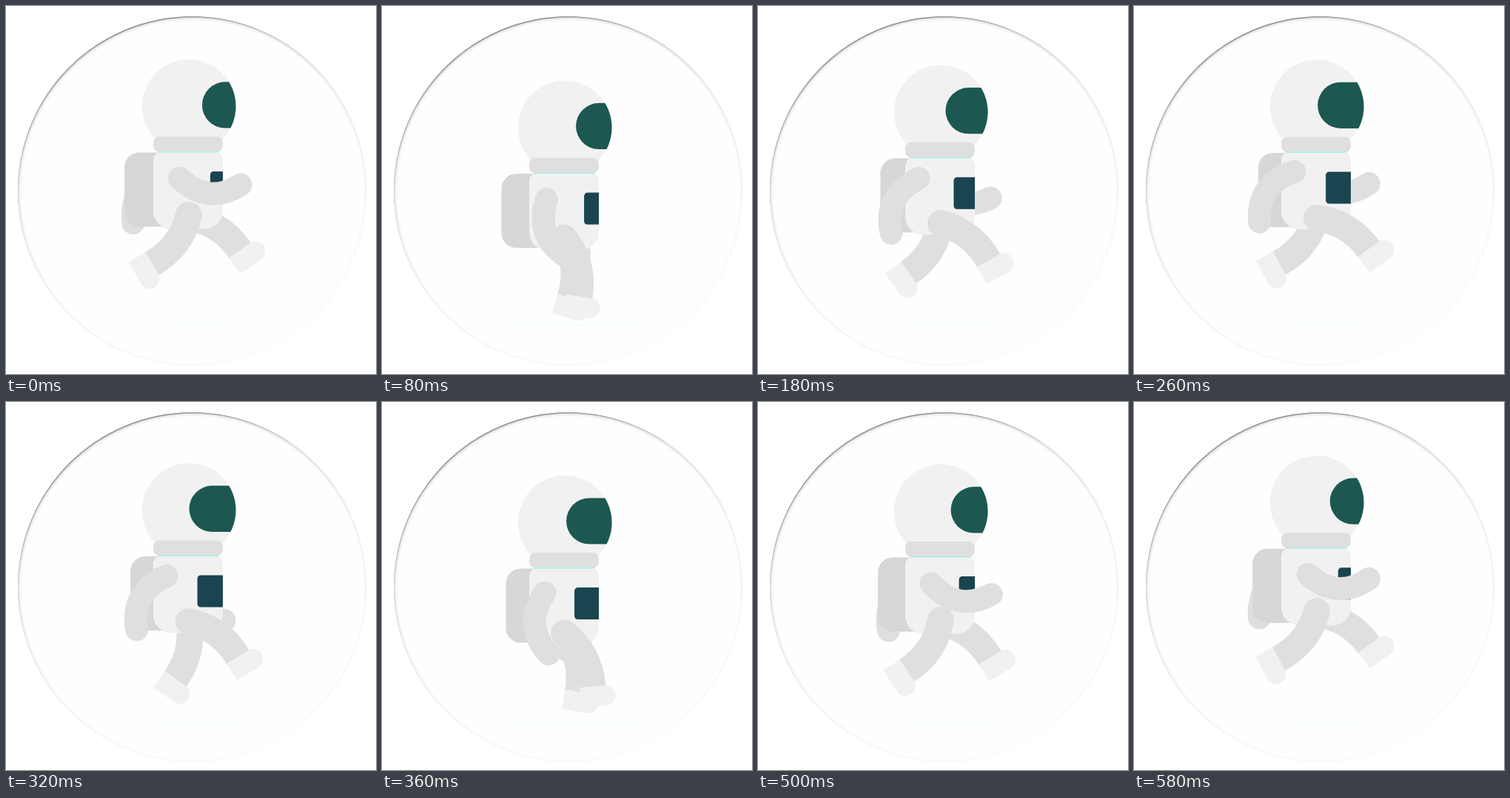
An HTML page for the animation above (0.6 s loop, 500 px wide and 496 px high).

```html
<!DOCTYPE html>
<html lang="en">
<head>
<meta charset="utf-8">
<title>Running astronaut</title>
<style>
  html, body { margin: 0; width: 100%; height: 100%; overflow: hidden; background: #fff; }
  #porthole {
    position: absolute; left: 16px; top: 14px; width: 471px; height: 471px; border-radius: 50%;
    background: #fefefe;
    box-shadow: inset 1px 2px 1px -1px rgba(0, 0, 0, .45), inset 1px 2px 4px rgba(0, 0, 0, .2);
  }
  svg { position: absolute; left: 0; top: 0; }
  .limb { fill: none; stroke: #dfdfdf; stroke-linecap: round; }
</style>
</head>
<body>
<div id="porthole"></div>
<svg width="500" height="496" viewBox="0 0 500 496">
  <defs>
    <path id="arm" class="limb" stroke-width="31" d="M6.4 9.7Q46.5 45 88.9 15.7"/>
    <g id="leg">
      <path class="limb" stroke-width="36" d="M-1.5 1.8Q41.5 6.8 68.5 43.3"/>
      <path fill="#f1f1f1" transform="translate(54.5 53.8) rotate(-36)"
            d="M0 0H34a13.3 13.3 0 0 1 0 26.6H0Z"/>
    </g>
    <circle id="helmet" cx="247.2" cy="135.3" r="63.4"/>
    <path id="torso" d="M209 197H283a10 10 0 0 1 10 10V276a24 24 0 0 1-24 24.5H223a24 24 0 0 1-24-24.5V207a10 10 0 0 1 10-10Z"/>
    <clipPath id="inHelmet"><use href="#helmet"/></clipPath>
    <clipPath id="inTorso"><use href="#torso"/></clipPath>
  </defs>
  <rect id="shadow" y="427" height="9" rx="4" fill="#f8fffe"/>
  <g id="runner">
    <use id="farArm" href="#arm"/>
    <use id="farLeg" href="#leg"/>
    <rect id="pack" y="197.5" width="75" height="100" rx="20" fill="#d7d7d7"/>
    <use href="#helmet" fill="#f1f1f1"/>
    <use href="#torso" fill="#f1f1f1"/>
    <g clip-path="url(#inTorso)">
      <rect id="panel" y="223" width="60" height="43" rx="4.5" fill="#1a4450"/>
    </g>
    <g clip-path="url(#inHelmet)">
      <rect id="visor" y="102.3" width="100" height="62.2" rx="31.1" fill="#1d5751"/>
    </g>
    <rect x="199" y="176" width="94" height="20.6" rx="8" fill="#dfdfdf"/>
    <rect x="205" y="196" width="83" height="1.5" fill="#a8efea"/>
    <use id="nearLeg" href="#leg"/>
    <use id="nearArm" href="#arm"/>
  </g>
</svg>
<script>
const LOOP = 600, STEP = 20;
const el = id => document.getElementById(id);
const clamp = x => Math.min(1, Math.max(0, x));

// cubic-bezier(.25, .1, .25, 1), solved by bisection
function ease(x) {
  let lo = 0, hi = 1;
  for (let i = 0; i < 20; i++) {
    const s = (lo + hi) / 2, r = 1 - s;
    if (.75 * s * r * r + .75 * s * s * r + s ** 3 < x) lo = s; else hi = s;
  }
  const r = 1 - lo;
  return .3 * lo * r * r + 3 * lo * lo * r + lo ** 3;
}

const move = (t, start, length) => ease(clamp((t - start) / length));

function place(id, x, y, angle) {
  el(id).setAttribute('transform', `translate(${x} ${y}) rotate(${angle})`);
}

// back: 0 = leg forward and arm behind, 1 = leg behind and arm forward
function swing(side, back) {
  place(side + 'Leg', 248.5, 283.7, 98 * back);
  place(side + 'Arm', 228.6, 222.3, 121 * (1 - back));
}

function draw(t) {
  const firstStep = move(t, -8, 278);
  swing('near', 1 - firstStep + move(t, 302, 275));
  swing('far', firstStep - move(t, 257, 333));

  const drop = 29 * (move(t, 0, 95) - move(t, 95, 195))
             + 35 * (move(t, 290, 148) - move(t, 438, 162));
  place('runner', 0, drop, 0);

  const sway = (1 - Math.cos(t / LOOP * 2 * Math.PI)) / 2;
  el('visor').setAttribute('x', 265 - 17.6 * sway);
  el('panel').setAttribute('x', 276 - 17.6 * sway);
  el('pack').setAttribute('x', 160 + 8.2 * sway);

  const beat = t % (LOOP / 2);
  const width = 74 + 92 * (clamp(beat / 55) - clamp((beat - 90) / 190));
  el('shadow').setAttribute('x', 259 - width / 2);
  el('shadow').setAttribute('width', width);
}

function tick() {
  draw(Math.floor(performance.now() % LOOP / STEP) * STEP);
  requestAnimationFrame(tick);
}
tick();
</script>
</body>
</html>
```
